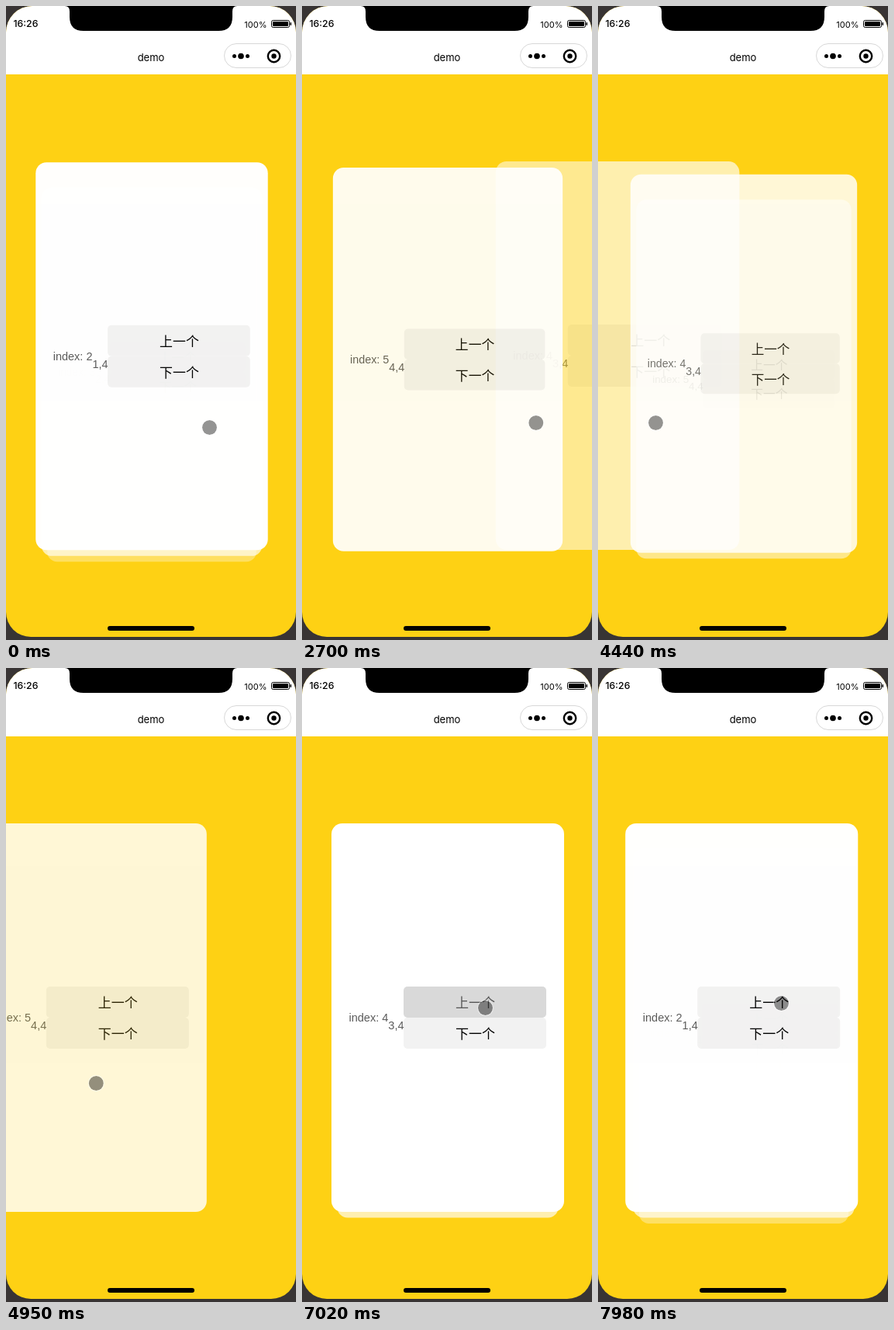
Animation, 374 px wide and 816 px high, one loop 8 s. Source, as an HTML page:

```html
<!DOCTYPE html>
<html lang="zh">
<head>
<meta charset="utf-8">
<title>demo</title>
<style>
html, body { margin: 0; width: 100%; height: 100%; overflow: hidden; background: #383434; }
#screen { position: absolute; left: 0; top: 0; width: 374px; height: 812px; overflow: hidden;
  border-radius: 34px 34px 32px 32px; background: #fed114; }
#bar { position: absolute; left: 0; top: 0; width: 374px; height: 88px; background: #fff; }
#bar svg { display: block; }
#bar text { font-family: Inter, "Liberation Sans", sans-serif; }
.card { position: absolute; left: 38px; top: 200px; width: 300px; height: 500px; border-radius: 14px;
  background: #fff; display: flex; align-items: center; justify-content: center;
  font: 14.5px/20px "Liberation Sans", Arial, sans-serif; color: #5a5a5a; white-space: pre; }
.pos { position: relative; top: 10px; }
.btn { width: 184px; height: 40px; border-radius: 5px; background: #f2f2f2; color: #000; text-align: center;
  font: 500 17px/40px "Noto Sans CJK SC", "Noto Sans CJK", sans-serif; }
.btn.on { background: #d9d9d9; color: #555; }
#dot { position: absolute; left: -11px; top: -11px; width: 19px; height: 19px; border-radius: 50%; z-index: 30;
  border: 1.5px solid rgba(255,255,255,.5); background: rgba(0,0,0,.42); background-clip: padding-box; }
#home { position: absolute; left: 131px; top: 798px; width: 112px; height: 6px; border-radius: 3px;
  background: #000; z-index: 40; }
</style>
</head>
<body>
<div id="screen">
  <div id="bar">
    <svg width="374" height="88">
      <path d="M76 0H298Q292 0 292 7V14Q292 32 274 32H100Q82 32 82 14V7Q82 0 76 0Z"/>
      <text x="9.5" y="27" font-size="12.3" font-weight="500">16:26</text>
      <text x="336.5" y="28" font-size="11" text-anchor="end">100%</text>
      <rect x="342.5" y="18.5" width="23" height="9" rx="2" fill="none" stroke="#000"/>
      <rect x="344" y="20" width="20" height="6" rx="1"/>
      <rect x="366.5" y="21" width="1.5" height="4" rx=".7"/>
      <text x="187" y="71" font-size="13" text-anchor="middle">demo</text>
      <rect x="281.5" y="48.5" width="86" height="31" rx="15.5" fill="none" stroke="#d8d8d8"/>
      <circle cx="294.5" cy="64.5" r="2.5"/>
      <circle cx="303" cy="64.5" r="3.8"/>
      <circle cx="311.5" cy="64.5" r="2.5"/>
      <circle cx="345.5" cy="64.5" r="7.7" fill="none" stroke="#000" stroke-width="2.4"/>
      <circle cx="345.5" cy="64.5" r="3.2"/>
    </svg>
  </div>
  <div id="dot"></div>
  <div id="home"></div>
</div>
<script>
const LOOP = 8000, COUNT = 5, OUT = 450;
const screenEl = document.getElementById('screen');
const dot = document.getElementById('dot');

const cards = Array.from({ length: COUNT }, (_, i) => {
  const el = document.createElement('div');
  el.className = 'card';
  el.innerHTML = `<span>index: ${i + 1}</span><span class="pos">${i},${COUNT - 1}</span>` +
    '<div><div class="btn">上一个</div><div class="btn">下一个</div></div>';
  screenEl.insertBefore(el, dot);
  return { el, prev: el.querySelector('.btn') };
});

// start, release, from x, to x, y, next front card
const swipes = [
  [740, 880, 180, 305, 543, 2],
  [1690, 1830, 180, 305, 541, 3],
  [2440, 2565, 180, 305, 537, 4],
  [3070, 3210, 180, 305, 540, 0],
  [3680, 3820, 180, 323, 540, 1],
  [3965, 4070, 196, 75, 538, 2],
  [4250, 4355, 196, 75, 537, 3],
  [4535, 4640, 196, 75, 536, 4],
  [4885, 4990, 196, 70, 535, 0]
];
// taps on the "previous" button: time, next front card
const taps = [[6000, 4], [6540, 3], [7050, 2], [7712, 1]];

const steps = [
  { t: -225, front: 1, dx: 125 },
  ...swipes.map(([, t, a, b, , front]) => ({ t, front, dx: b - a })),
  ...taps.map(([t, front]) => ({ t, front, dx: 0 }))
];

const knots = [
  [0, 263, 543], [480, 263, 543], [660, 180, 543],
  [1130, 276, 543], [1550, 276, 543], [1660, 180, 541],
  [2150, 290, 540], [2340, 290, 540], [2950, 190, 539], [3600, 180, 540],
  [5400, 75, 535], [5850, 237, 438], [7500, 237, 438], [7800, 237, 432], [LOOP, 237, 432],
  ...swipes.flatMap(([s, e, a, b, y]) => [[s, a, y], [e, b, y], [e + 130, b, y]])
].sort((a, b) => a[0] - b[0]);

const mix = (a, b, p) => a + (b - a) * p;

function bezier(x1, y1, x2, y2) {
  const at = (a, b, u) => 3 * a * u * (1 - u) ** 2 + 3 * b * u * u * (1 - u) + u ** 3;
  return x => {
    if (x <= 0) return 0;
    if (x >= 1) return 1;
    let lo = 0, hi = 1;
    for (let n = 0; n < 20; n++) {
      const mid = (lo + hi) / 2;
      if (at(x1, x2, mid) < x) lo = mid; else hi = mid;
    }
    return at(y1, y2, lo);
  };
}
const ease = bezier(.25, .1, .25, 1);
const easeInOut = bezier(.42, 0, .58, 1);

function dotAt(t) {
  const i = Math.max(1, knots.findIndex(k => k[0] > t));
  const [a, b] = [knots[i - 1], knots[i]];
  const p = (t - a[0]) / (b[0] - a[0]);
  return [mix(a[1], b[1], p), mix(a[2], b[2], p)];
}

const opacity = p => Math.max(0, 1 - Math.abs(p.x) / OUT) * Math.max(0, 1 - p.d / 3);
const isOut = (i, front) => i < front || (front === 0 && i === COUNT - 1);
const target = (i, front, side) =>
  isOut(i, front) ? { x: side * OUT, d: 0 } : { x: 0, d: i - front };

function poseAt(c, t) {
  const p = c.out ? easeInOut((t - c.t) / 380) : ease((t - c.t) / 300);
  return { x: mix(c.from.x, c.to.x, p), d: mix(c.from.d, c.to.d, p) };
}

// Replays every step up to t and returns the stack at that moment.
function stackAt(t) {
  let front = 0;
  const stack = cards.map((_, i) => {
    const to = target(i, 0, 1);
    return { from: to, to, t: -1e4, side: 1, out: isOut(i, 0) };
  });
  for (const s of steps) {
    if (s.t > t) break;
    stack.forEach((c, i) => {
      const now = poseAt(c, s.t);
      if (i === front) now.x += s.dx;
      if (!s.dx) c.side = -1;
      else if (i === front) c.side = Math.sign(s.dx);
      const to = target(i, s.front, c.side);
      const out = isOut(i, s.front);
      if (to.x === c.to.x && to.d === c.to.d && i !== front) return;
      const hidden = opacity(now) < .002 && opacity(to) < .002;
      Object.assign(c, { from: hidden ? to : now, to, t: s.t, out });
    });
    front = s.front;
  }
  return { front, stack };
}

function draw(t) {
  const { front, stack } = stackAt(t);
  const [x, y] = dotAt(t);
  const drag = swipes.find(s => t >= s[0] && t < s[1]);
  const tap = taps.findIndex(k => t >= k[0] - 40 && t < k[0] + 70);
  const pressed = tap < 0 ? -1 : tap ? taps[tap - 1][1] : 0;
  stack.forEach((c, i) => {
    const p = poseAt(c, t);
    if (drag && i === front) p.x += x - drag[2];
    const { el, prev } = cards[i];
    const o = opacity(p);
    el.style.visibility = o < .002 ? 'hidden' : 'visible';
    el.style.opacity = o;
    el.style.transform = `translate(${p.x}px,${20 * p.d}px) scale(${1 - .05 * p.d})`;
    el.style.zIndex = c.out ? 1 : 10 - c.to.d;
    prev.classList.toggle('on', i === pressed);
  });
  dot.style.transform = `translate(${x}px,${y}px)`;
}

const start = performance.now();
function frame() {
  draw((performance.now() - start) % LOOP);
  requestAnimationFrame(frame);
}
frame();
</script>
</body>
</html>
```
